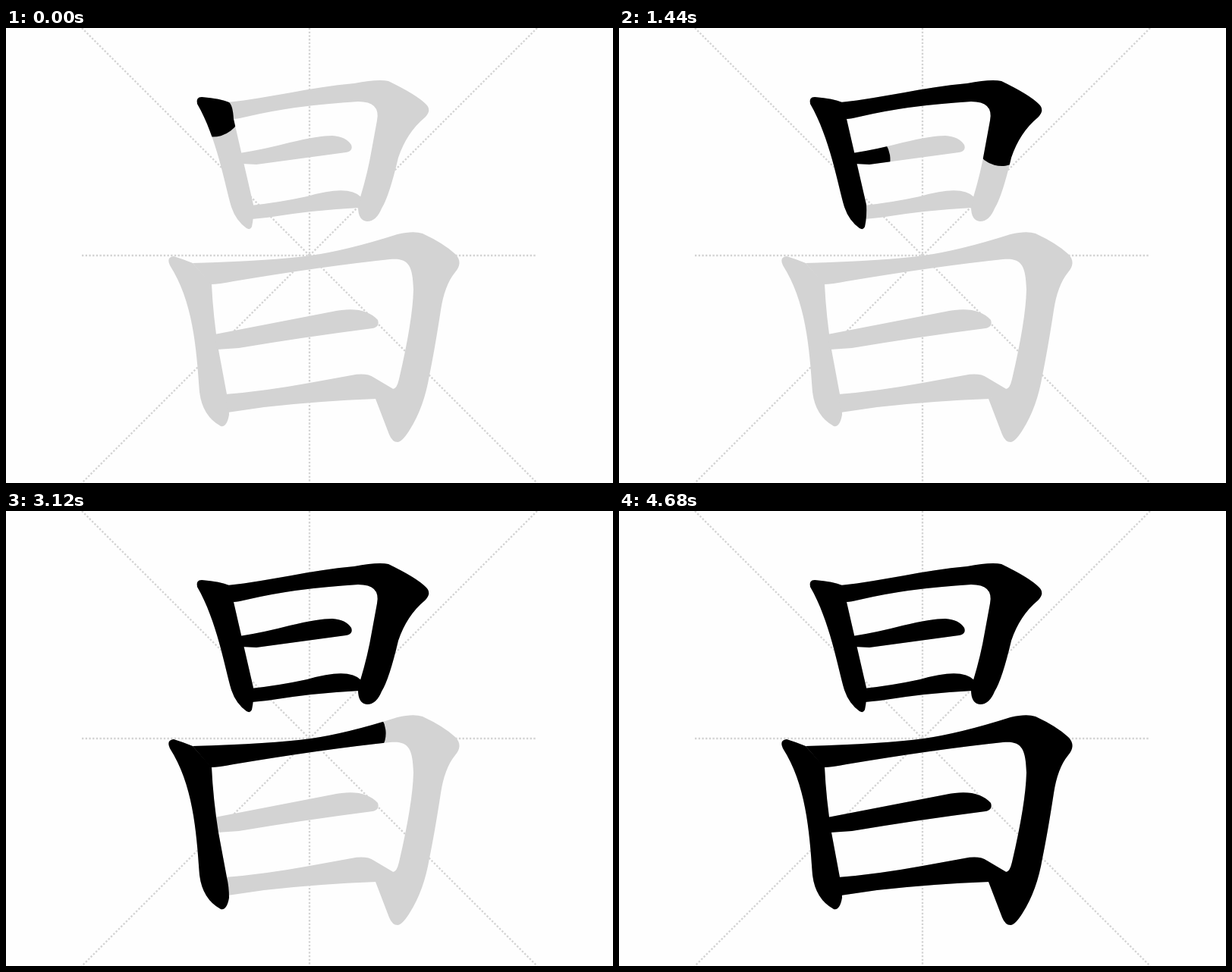
Recreate the animation shown at these times as an HTML page with a canvas. Size 800x600 px, loop 4740 ms.

```html
<!DOCTYPE html>
<html lang="zh">
<head>
<meta charset="utf-8">
<style>
  html, body { margin: 0; width: 100%; height: 100%; overflow: hidden; background: #fefefe; }
  canvas { display: block; }
</style>
</head>
<body>
<canvas id="stage" width="800" height="600"></canvas>
<script>
const ctx = document.getElementById('stage').getContext('2d');
const STEP = 60;
const OVERLAP = 400; // each stroke begins this long before the previous one ends
const UNIT = 600 / 1024;
const BRUSH = 128 * UNIT;
const GREY = '#d3d3d3';

const strokes = [];
let clock = 0;

// The brush runs along its route at constant speed and inks only the outline.
function addStroke(duration, route, outline) {
  const points = route.split(' ').map(p => p.split(',').map(Number));
  const spine = new Path2D('M' + route);
  const length = points.slice(1).reduce((sum, [x, y], i) =>
    sum + Math.hypot(x - points[i][0], y - points[i][1]), 0);
  strokes.push({ start: clock, duration, spine, length, shape: new Path2D(outline) });
  clock += duration - OVERLAP;
}

// Upper box
addStroke(830, '273,106 316,259',
  'M252 100Q250 91 258 91Q283 93 294 98Q299 102 300 120Q311 168 326 233Q327 248 324 262Q322 267 317 264Q303 254 297 236C288 205 278 145 252 100Z');
addStroke(1380, '300,109 497,83 523,106 505,143 478,242',
  'M292 98C350 92 400 78 459 73Q490 67 504 70Q541 88 553 100Q562 108 552 118Q528 138 517 171Q505 222 495 238Q488 255 476 255Q464 254 464 236L467 223Q477 190 482 160L489 122Q494 97 464 97Q380 102 317 117Q305 120 300 120Z');
addStroke(860, '315,174 455,152',
  'M308 165Q340 160 374 151Q412 142 430 142Q448 143 455 154Q458 162 448 164L330 180L311 179Z');
addStroke(720, '328,242 463,224',
  'M323 234Q360 230 397 222Q452 206 468 223L466 237Q405 240 344 250L324 252Z');

// Lower box
addStroke(900, '232,312 246,345 264,422 284,512',
  'M216 313Q211 302 221 301Q234 305 246 310L271 338Q273 380 280 424L291 483Q294 495 294 510Q291 527 283 525Q259 512 255 480C251 420 246 360 216 313Z');
addStroke(1195, '265,320 516,286 564,308 554,363 531,501 515,552',
  'M246 310Q350 307 402 300Q450 293 516 272Q537 267 549 271Q577 284 592 298Q603 309 592 322Q578 339 573 372Q565 424 558 458Q551 500 532 530Q522 546 516 546Q509 546 505 536L487 489L510 476Q515 476 518 463Q536 386 537 345C536 312 530 303 506 305Q420 314 300 334Q280 338 270 338Z');
addStroke(930, '285,413 482,384',
  'M275 404L430 374Q472 365 490 385Q493 394 483 396Q390 408 307 422L278 424Z');
addStroke(725, '300,494 380,483 500,474',
  'M289 483Q340 479 400 468L455 458Q475 454 485 461L512 477L488 489Q410 492 340 500L292 507Z');

const LOOP = clock + OVERLAP;

function drawGuides() {
  ctx.strokeStyle = GREY;
  ctx.lineWidth = 4 * UNIT;
  ctx.lineCap = 'butt';
  ctx.setLineDash([4 * UNIT, 4 * UNIT]);
  for (const line of ['M100 0L700 600', 'M700 0L100 600', 'M400 0V600', 'M100 300H700']) {
    ctx.stroke(new Path2D(line));
  }
}

function inkStroke({ start, duration, spine, length, shape }, t) {
  const progress = (t - start) / duration;
  if (progress < 0) return;
  if (progress >= 1) {
    ctx.fill(shape);
    return;
  }
  ctx.save();
  ctx.clip(shape);
  ctx.setLineDash([length * progress + 0.1, length * 2]);
  ctx.lineWidth = BRUSH;
  ctx.lineCap = ctx.lineJoin = 'round';
  ctx.strokeStyle = '#000';
  ctx.stroke(spine);
  ctx.restore();
}

function draw(t) {
  ctx.fillStyle = '#fefefe';
  ctx.fillRect(0, 0, 800, 600);
  drawGuides();
  ctx.fillStyle = GREY;
  for (const { shape } of strokes) ctx.fill(shape);
  ctx.fillStyle = '#000';
  for (const stroke of strokes) inkStroke(stroke, t);
}

let origin = null;
function tick(now) {
  origin ??= now;
  draw(Math.floor((now - origin) % LOOP / STEP) * STEP);
  requestAnimationFrame(tick);
}
draw(0);
requestAnimationFrame(tick);
</script>
</body>
</html>
```
